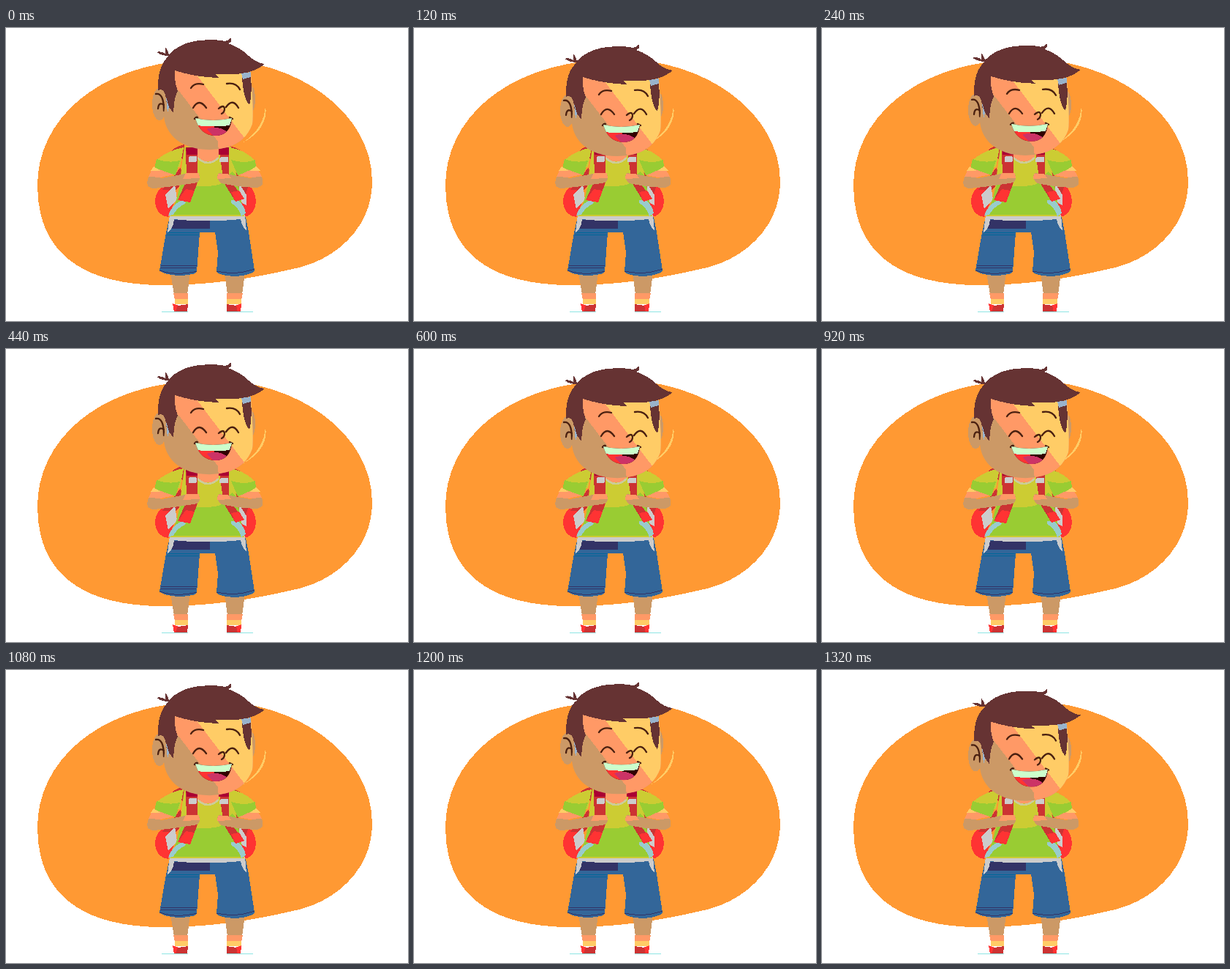
Write an HTML page that moves like this. It is 550 px wide and 400 px high and loops after 1560 ms.

```html
<!DOCTYPE html>
<html lang="en">
<head>
<meta charset="utf-8">
<title>Laughing schoolboy</title>
<style>
html, body { margin: 0; width: 100%; height: 100%; overflow: hidden; background: #fff; }
svg { display: block; width: 550px; height: 400px; shape-rendering: crispEdges; }
.skin { fill: #c96; } .peach { fill: #f96; } .sun { fill: #fc6; }
.hair { fill: #633; } .lime { fill: #9c3; } .moss { fill: #cc3; }
.red { fill: #f33; } .brick { fill: #c33; } .wine { fill: #a03; }
.grey { fill: #ccc; } .blue { fill: #369; } .navy { fill: #336; } .ice { fill: #9cc; }
.line { fill: none; stroke: #4a2010; stroke-width: 2.3; stroke-linecap: round; shape-rendering: auto; }
</style>
</head>
<body>
<svg viewBox="0 0 550 400">
  <defs>
    <clipPath id="face"><path d="M231 55C222 78 217 99 216 120C218 143 235 160 263 165Q284 168 302 163Q328 156 337 131Q339 115 335 63Z"/></clipPath>
    <clipPath id="mouth"><path d="M259 123Q283 129 309 123Q307 147 286 147Q265 146 259 123Z"/></clipPath>
    <clipPath id="shirt"><path d="M244 162L308 162L318 215Q322 240 326 257L224 257Q237 231 238 208Z"/></clipPath>
  </defs>

  <path fill="#f93" d="M43 215C43 125 125 48 265 43C390 36 501 112 501 210C501 270 455 312 405 326C350 339 290 351 215 351C85 351 43 290 43 215Z"/>
  <path class="sun" d="M355 105Q360 138 323 157Q354 137 355 105Z"/>

  <g id="backpack">
    <path class="brick" d="M244 159Q228 162 222 174L248 180ZM300 160Q319 162 327 174L304 180Z"/>
    <path class="red" d="M227 207Q203 220 204 238Q206 256 222 258L230 238ZM324 205Q341 218 342 238Q340 255 326 258L318 238Z"/>
    <path class="brick" d="M239 190L214 221L232 222L243 210ZM309 190L331 218L327 229L310 212Z"/>
    <path class="grey" d="M231 214L218 228L222 247L234 234ZM319 212L329 228V242L318 236Z"/>
  </g>

  <g id="legs">
    <path class="skin" d="M225 334H252L248 364H230ZM299 334H327L323 364H303Z"/>
    <path class="peach" d="M229 362H249V371H231ZM302 362H324L322 371H302Z"/>
    <path class="sun" d="M231 370H249V377H231ZM302 370H322V377H302Z"/>
    <path class="red" d="M228 376L236 379L249 377L248 388H230ZM302 377L314 379L322 376L321 388H302Z"/>
    <path class="brick" d="M235 379L249 377L248 388H232ZM302 377L315 379L317 388H302Z"/>
    <path stroke="#8ee5e3" stroke-width="1.5" d="M213 387.6H249M302 387.6H338"/>
    <path class="blue" d="M224 258H328L332 279L340 331Q337 337 314 339Q292 338 288 333L290 306L286 279H265L261 333Q258 337 238 338Q216 337 210 331L219 279Z"/>
    <path class="navy" d="M229 262H279V274H227Z"/>
    <path fill="none" stroke="#069" d="M221 279.5H265M220 282.5H264"/>
    <path fill="none" stroke="#336" d="M212 324.5H261M211 327.5H260M210 331Q235 339 261 332M288 332Q314 338 340 329"/>
    <path class="grey" d="M224 255H327L329 277Q323 272 321 261Q273 266 230 261Q229 274 221 279Z"/>
  </g>

  <g id="torso">
    <g clip-path="url(#shirt)">
      <path class="moss" d="M220 160H330V260H220Z"/>
      <path class="lime" d="M240 213Q275 219 294 213L309 196L330 215V255H220Z"/>
    </g>
    <path class="moss" d="M243 163Q224 166 206 180L209 190H238ZM306 163Q326 166 341 181L337 190H314Z"/>
    <path class="lime" d="M206 179Q222 185 238 181L232 201Q215 198 203 192ZM308 180Q327 186 341 180L342 190Q330 199 317 201Z"/>
    <path class="peach" d="M262 160H291V178Q277 187 262 178Z"/>
    <path fill="none" stroke="#cc9" stroke-width="2.5" d="M262 177Q276 191 291 177"/>
    <path class="ice" d="M222 256Q226 242 242 234L246 239Q233 246 229 255ZM308 235L316 234Q326 241 328 253L322 257Q318 244 308 239Z"/>
    <path class="brick" d="M246 163H262V211L252 238L235 235L247 208ZM291 163H305V205L325 233L314 237L298 211Z"/>
    <path class="red" d="M246 220L258 222L252 238L235 235ZM308 224L319 222L326 233L314 237Z"/>
    <path class="wine" d="M246 163H262V173H247ZM291 163H305V173H291Z"/>
    <path class="grey" d="M252 175H259Q261 175 261 177V181Q261 183 259 183H252Q250 183 250 181V177Q250 175 252 175ZM294 176H304V183H292V178Z"/>
    <path class="skin" d="M196 201Q188 219 203 219Q234 216 262 211Q268 205 263 198L245 199L213 205ZM349 201Q356 216 343 218Q316 217 295 212Q286 205 291 198L306 200L334 205Z"/>
    <path class="peach" d="M201 190L229 200L212 204L195 203ZM343 190L318 201L334 204L350 203ZM246 198L264 198L265 205L242 206ZM290 199L304 199L308 205L289 206Z"/>
    <path class="sun" d="M202 189L212 195H198ZM342 189L348 195H333Z"/>
  </g>

  <g id="head">
    <ellipse class="skin" cx="210" cy="104" rx="10" ry="22"/>
    <ellipse class="skin" cx="335" cy="97" rx="6" ry="18"/>
    <path class="line" d="M205 90Q216 88 216 113M208 110Q209 100 216 105"/>
    <g clip-path="url(#face)">
      <path class="skin" d="M210 50H345V170H210Z"/>
      <path class="peach" d="M215 58L290 155L291 170H345V50Z"/>
      <path class="sun" d="M254 55L330 155L345 130V50Z"/>
    </g>
    <path class="hair" d="M208 85Q207 51 223 38Q213 38 206 33Q213 31 218 35L218 26Q222 31 223 36Q238 20 265 17Q288 15 299 18Q306 17 307 13Q311 18 304 21Q321 27 332 38Q343 48 354 49Q336 64 305 63L286 63L292 68Q258 67 231 58Q230 73 235 86Q230 94 229 116L220 104L218 91Q215 82 208 85Z"/>
    <path class="hair" d="M323 68L335 65Q337 90 333 105Q325 98 323 68Z"/>
    <path fill="#99b3cc" d="M322 62L335 60V67L324 70ZM219 94L223 108L221 116Z"/>
    <path class="line" d="M253 82Q258 74 270 77M302 76Q315 74 320 84M256 109Q264 95 274 109M301 108Q310 95 318 109M291 110Q298 104 299 110Q299 115 295 117M258 124Q260 121 262 122M306 122L310 124"/>
    <g clip-path="url(#mouth)">
      <path fill="#300" d="M255 118H314V152H255Z"/>
      <path class="red" d="M259 133H284L292 150H260Z"/>
      <path fill="#c36" d="M274 138Q291 132 304 143L293 150H286Z"/>
      <path fill="#cfc" d="M257 120H310L306 133Q282 136 261 133Z"/>
    </g>
  </g>
</svg>
<script>
const STEP = 40, LOOP = 1560, LAST = 33;
// Turning points of the nod, in steps; the head alternates between up and down.
const turns = [0, 4.2, 9, 14, 19, 24, 29, 33];
const DROP = 12.5;
const head = document.getElementById("head");

function nod(step) {
  let i = 0;
  while (i < turns.length - 2 && step >= turns[i + 1]) i++;
  const part = (step - turns[i]) / (turns[i + 1] - turns[i]);
  return DROP * (i % 2 ? 1 - part : part);
}

function draw() {
  const step = Math.min(LAST, Math.floor(performance.now() % LOOP / STEP));
  head.setAttribute("transform", `translate(0 ${nod(step)})`);
  requestAnimationFrame(draw);
}
draw();
</script>
</body>
</html>
```
